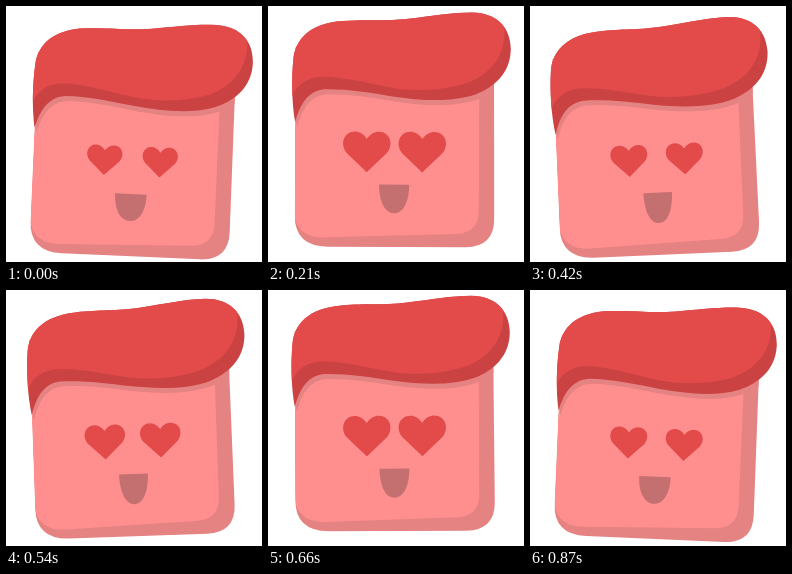
An HTML page for the animation above (900 ms loop, 256 by 256 pixels).

```html
<!DOCTYPE html>
<html lang="en">
<head>
<meta charset="utf-8">
<title>Bouncing cube in love</title>
<style>
  html, body { margin: 0; width: 100%; height: 100%; overflow: hidden; background: #fff; }
  svg { display: block; width: 256px; height: 256px; }
</style>
</head>
<body>
<svg viewBox="0 0 256 256">
  <defs>
    <path id="heart" d="M0 21L-20.5 1.5C-26 -5 -25 -14 -19.5 -18S-5 -21 0 -13C5 -21 14 -22 19.5 -18S26 -5 20.5 1.5Z"/>
    <path id="hair" d="M27 116C23.500 97 23 72 25 52C27 34 40 17 74 14.500C100 12.500 112 15 140 12C165 9 184 5.500 204 5.500C228 6 242 20 242.300 42C242 66 226 80 207 87.500C182 96 152 93.500 126 90C100 86 79 82.500 56 83C38 85 31 101 27 116Z"/>
    <clipPath id="cube"><path d="M27 40H225.500L226.500 212Q226.500 240 198 240.300H60Q27 240 27 209Z"/></clipPath>
    <clipPath id="hairClip"><use href="#hair"/></clipPath>
  </defs>
  <g id="figure">
    <g clip-path="url(#cube)">
      <path fill="#e58282" d="M20 40H230V245H20Z"/>
      <path fill="#ff8f8f" d="M27 40H211V204Q211 225 190 227L57 231Q32 232 27 211Z"/>
      <use href="#hair" x="2" y="5" fill="#e58282"/>
    </g>
    <use href="#hair" fill="#cb4243"/>
    <path fill="#e34b4b" clip-path="url(#hairClip)" d="M20 100C24 88 30 72.500 52 70.500C76 70 100 77 126 81.500C152 85 178 83 200 75.500C222 66 240 48 235 14V0H20Z"/>
    <g fill="#e34b4b">
      <use class="eye" href="#heart"/>
      <use class="eye" href="#heart"/>
    </g>
    <path id="mouth" fill="#c57070" d="M-15 0H15C15 17 9 28 0 28S-15 17 -15 0Z"/>
  </g>
</svg>
<script>
  const LOOP = 900, STEP = 30;
  const figure = document.getElementById('figure');
  const mouth = document.getElementById('mouth');
  const eyes = document.querySelectorAll('.eye');

  function draw(now) {
    const phase = Math.floor(now % LOOP / STEP) * STEP / LOOP;
    const sway = Math.cos(phase * 2 * Math.PI);
    const drop = Math.abs(1 - phase * 4 % 2); // 1 at the bottom, 0 at the top of a hop

    figure.setAttribute('transform', `translate(0 ${10 * drop}) rotate(${2.5 * sway} 126 150)`);
    eyes.forEach((eye, i) =>
      eye.setAttribute('transform',
        `translate(${98.8 + 55.5 * i - 0.5 * sway} 145) scale(${1 - 0.27 * drop})`));
    mouth.setAttribute('transform',
      `translate(${126.3 - 0.2 * sway} 178) scale(${1 + 0.05 * sway} ${1.03 - 0.06 * sway})`);
    requestAnimationFrame(draw);
  }
  requestAnimationFrame(draw);
</script>
</body>
</html>
```
